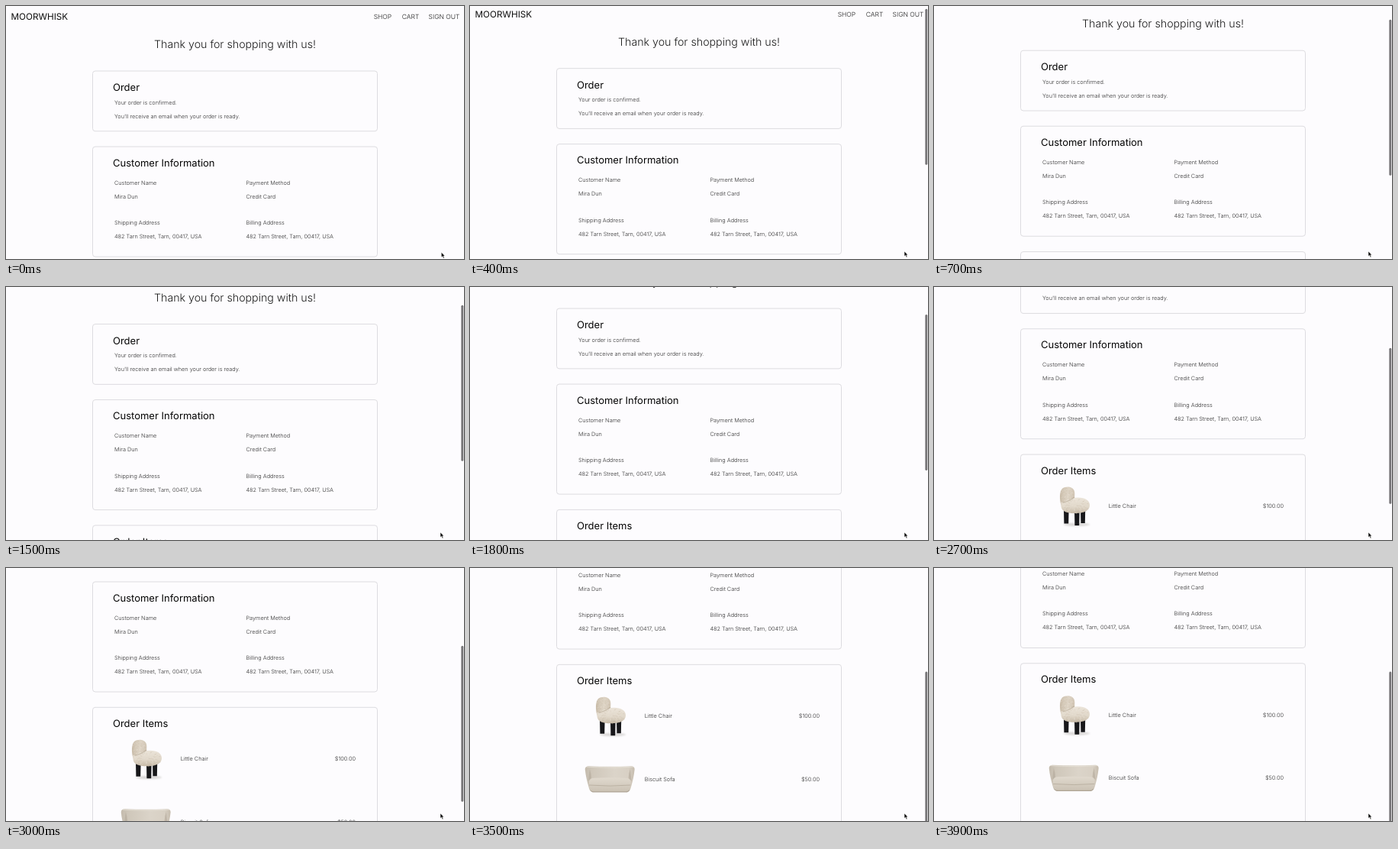
These frames come from a looping animation (600 by 331 pixels, 4 s). An HTML page:

```html
<!DOCTYPE html>
<html lang="en">
<head>
<meta charset="utf-8">
<title>Order confirmation</title>
<style>
  html, body { margin: 0; width: 100%; height: 100%; overflow: hidden; background: #fdfcfe; }
  svg { display: block; width: 600px; height: 331px; }
  text { font: 300 7.3px Inter, "Open Sans", sans-serif; fill: #2e2e2e; text-rendering: geometricPrecision; }
  .brand { font-size: 11.7px; font-weight: 400; fill: #0c0c0c; }
  .nav { font-size: 8.5px; fill: #222; }
  .title { font-size: 14.2px; fill: #1c1c1c; text-anchor: middle; }
  .head { font-size: 13px; font-weight: 400; fill: #050505; }
  .price { text-anchor: end; }
  .card { fill: none; stroke: #dddce0; stroke-width: 1; }
</style>
</head>
<body>
<svg viewBox="0 0 600 331">
  <defs>
    <linearGradient id="wool" x1="0" y1="0" x2="1" y2="0">
      <stop offset="0" stop-color="#c9bca9"/><stop offset=".5" stop-color="#ddd3c4"/><stop offset="1" stop-color="#d2c6b5"/>
    </linearGradient>
    <linearGradient id="pad" x1="0" y1="0" x2="0" y2="1">
      <stop offset="0" stop-color="#ebe4d9"/><stop offset=".6" stop-color="#e0d7c9"/><stop offset="1" stop-color="#c5b8a5"/>
    </linearGradient>
    <linearGradient id="back" x1="0" x2="1">
      <stop offset="0" stop-color="#c4bbad"/><stop offset=".14" stop-color="#cfc7ba"/>
      <stop offset=".6" stop-color="#dbd4c9"/><stop offset=".88" stop-color="#d8d0c4"/><stop offset="1" stop-color="#c6bcae"/>
    </linearGradient>
    <linearGradient id="seat" x1="0" y1="0" x2="0" y2="1">
      <stop offset="0" stop-color="#e0d9ce"/><stop offset="1" stop-color="#cbc2b4"/>
    </linearGradient>
    <filter id="soft" x="-30%" y="-200%" width="160%" height="500%"><feGaussianBlur stdDeviation="1.3"/></filter>
  </defs>

  <g id="page">
    <g id="copy"></g>

    <g transform="translate(0 223.5)">
      <ellipse cx="187" cy="216.500" rx="17" ry="2" fill="#d9d7d6" filter="url(#soft)"/>
      <g fill="#17171a">
        <path d="M170 197h6.600l-.4 18.300h-5.800z"/>
        <path d="M192 197h6.200l-.4 17.800h-5.400z"/>
        <path d="M184 199h6.600l-.4 18.800h-5.800z"/>
      </g>
      <path fill="url(#wool)" d="M166.500 191c-2.200-7-2.300-18 1.500-21.500 4.500-3.800 14-3 15.800 3 1.300 4.500-.3 8 .7 13z"/>
      <path fill="url(#pad)" d="M166.500 187.500c5-1 9-6 22-6.300 9-.2 15.600 3.600 15.500 10-.1 7-7 10.300-18 10.600-11 .3-18-2-19.300-8-.5-2.300-.4-4.500-.2-6.300z"/>
      <path fill="none" stroke="#a99a85" stroke-opacity=".55" stroke-width="1.400" stroke-linecap="round" d="M169 187.500q8-1.500 14.500-6.500"/>
      <g id="fur" fill="none" stroke-width=".4" stroke-linecap="round" opacity=".7"></g>
    </g>

    <g transform="translate(0 223.5)">
      <path d="M155 293h60" stroke="#b9b4ae" stroke-width="2.400" filter="url(#soft)"/>
      <path d="M200 294h27" stroke="#e0dedd" stroke-width="2.400" filter="url(#soft)"/>
      <path fill="url(#back)" d="M150.800 262.500c-.3-3.500 2-5 5.700-4.800 17 .8 37 .8 53.500 0 4-.2 6 1.400 5.600 4.800-.8 8-2.600 15-4.600 22.500-1.200 4.500-2.300 6-5.500 6.300H161c-3.200-.3-4.400-1.800-5.500-6.300-2-7.500-4-14.500-4.700-22.500z"/>
      <path fill="#b3a899" fill-opacity=".6" d="M156.800 261.500q2 6 2.200 12l-4 3.500zM209.800 261.500q-2 6-2.200 12l4 3.500z"/>
      <path fill="none" stroke="#e7e2d9" stroke-width=".8" d="M153 258.600c18 1.200 43 1.200 61 0"/>
      <path fill="#afa495" d="M156.500 281h53.500l-1 8.200q-1 2.800-5 2.800h-41.500q-4 0-5-2.800z"/>
      <path fill="url(#seat)" d="M155.800 278q1-4.500 7-4.700 20-1 40.500 0 6.300.2 7.200 4.700l-.6 8.500q-1 4-6 4.300h-41.500q-5.300-.3-6.100-4.300z"/>
      <path fill="none" stroke="#b1a697" stroke-width=".7" d="M156.300 282.500q27 2.200 54 0"/>
    </g>
  </g>

  <rect id="thumb" x="596.300" width="3" height="204" rx="1.500" fill="#777678"/>
  <path id="cursor" d="M0 0v6.600l1.500-1.400 1.200 2.700 1.200-.5-1.200-2.600h2z" fill="#050505" stroke="#fff" stroke-width=".5"/>
</svg>

<script>
const NS = "http://www.w3.org/2000/svg";
const $ = id => document.getElementById(id);

function add(parent, tag, attrs, label) {
  const el = document.createElementNS(NS, tag);
  for (const key in attrs) el.setAttribute(key, attrs[key]);
  if (label) el.textContent = label;
  parent.append(el);
}

const copy = $("copy");
const write = (x, y, label, kind = "") => add(copy, "text", { x, y, class: kind }, label);
const card = (y, height) => add(copy, "rect", { class: "card", x: 113.5, y, width: 373, height, rx: 3.5 });

write(6.5, 18.4, "MOORWHISK", "brand");
write(481.7, 17.3, "SHOP", "nav");
write(518.8, 17.3, "CART", "nav");
write(553.6, 17.3, "SIGN OUT", "nav");
write(300, 55.2, "Thank you for shopping with us!", "title");

card(85, 78.8);
write(140, 111.3, "Order", "head");
write(142, 128.5, "Your order is confirmed.");
write(142, 146.5, "You'll receive an email when your order is ready.");

card(184, 144);
write(140, 209.7, "Customer Information", "head");
const address = "482 Tarn Street, Tarn, 00417, USA";
const columns = [
  [142, "Customer Name", "Mira Dun", "Shipping Address"],
  [314.5, "Payment Method", "Credit Card", "Billing Address"]
];
for (const [x, label, value, place] of columns) {
  write(x, 233.5, label);
  write(x, 251.5, value);
  write(x, 286, place);
  write(x, 304, address);
}

card(348.3, 260);
write(140, 374, "Order Items", "head");
const items = [[418.3, "Little Chair", "$100.00"], [500.9, "Biscuit Sofa", "$50.00"]];
for (const [y, name, price] of items) {
  write(228.7, y, name);
  write(458, y, price, "price");
}

// Seeded tufts around the back and the seat of the chair
let seed = 11;
const rand = () => (seed = seed * 16807 % 2147483647) / 2147483647;
const tones = ["#f1ebe1", "#bfb19c", "#e2d9cb"];
function tufts(count, cx, cy, rx, ry) {
  for (let i = 0; i < count; i++) {
    const a = rand() * Math.PI * 2, r = Math.sqrt(rand());
    const x = cx + Math.cos(a) * rx * r, y = cy + Math.sin(a) * ry * r;
    const d = `M${x} ${y}l${Math.cos(a) * 1.5 + rand() - .5} ${Math.sin(a) * 1.2 + rand()}`;
    add($("fur"), "path", { d, stroke: tones[i % 3] });
  }
}
tufts(60, 174.5, 177, 8, 8.5);
tufts(110, 186, 192, 16.5, 8.5);

// Each fling: start time, distance travelled over six steps
const LOOP = 4000, STEP = 100, END = 222;
const flings = [[400, 33.5], [1500, 29.3], [2100, 61.2], [2700, 52.5], [3300, 75.8]];
const shares = [.1, .34, .6, .8, .93, 1];

function scrollAt(t) {
  let y = 0;
  for (const [start, distance] of flings) {
    if (t < start) break;
    y += distance * shares[Math.min(5, Math.floor((t - start) / STEP))];
  }
  return y > END ? END + (y - END) * .05 : y;
}

function draw(now) {
  const t = now % LOOP;
  const y = scrollAt(t);
  $("page").setAttribute("transform", `translate(0 ${-y})`);
  $("thumb").setAttribute("y", 1.7 + .603 * Math.min(y, END));
  $("thumb").style.display = y ? "" : "none";
  $("cursor").setAttribute("transform", t < STEP ? "translate(570.3 322.2)" : "translate(569 320.9)");
}

const began = performance.now();
function tick() {
  draw(performance.now() - began);
  requestAnimationFrame(tick);
}
tick();
</script>
</body>
</html>
```
